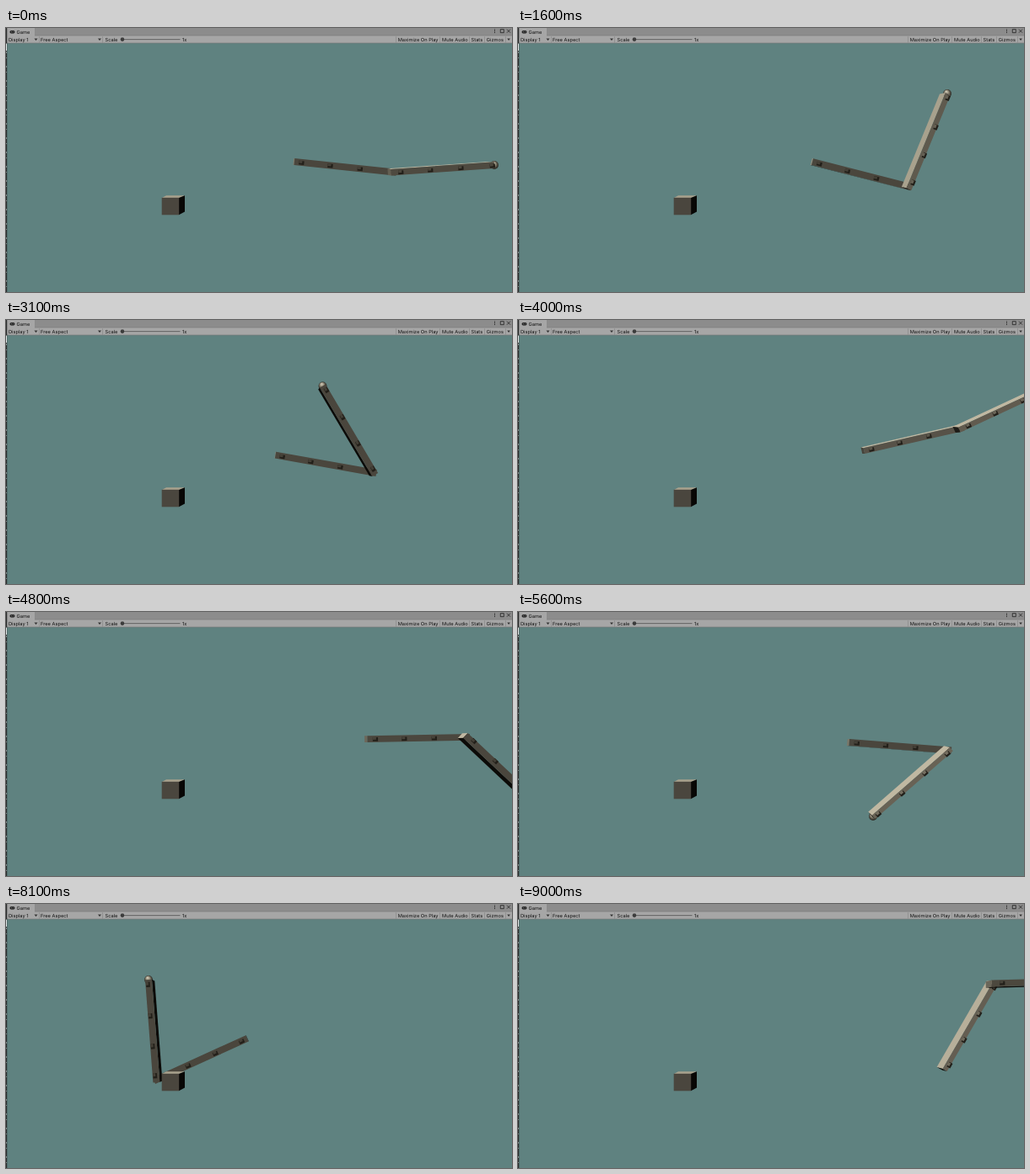
An HTML page that plays this animation: 600x314 px, repeating every 9.1 s.

```html
<!DOCTYPE html>
<html lang="en">
<head>
<meta charset="utf-8">
<title>Two-link arm</title>
<style>
html, body { margin: 0; width: 100%; height: 100%; overflow: hidden; background: #5f8280; }
svg { display: block; width: 100%; height: 100%; }
text { font: 5.7px Inter, Roboto, sans-serif; fill: #111; text-rendering: geometricPrecision; }
</style>
</head>
<body>
<svg viewBox="0 0 600 314" preserveAspectRatio="none">
  <defs>
    <radialGradient id="ball" cx=".5" cy=".5" r=".55" fx=".36" fy=".22">
      <stop offset="0" stop-color="#d6d0be"/>
      <stop offset=".4" stop-color="#99927f"/>
      <stop offset=".8" stop-color="#3f3b33"/>
      <stop offset="1" stop-color="#15130f"/>
    </radialGradient>
  </defs>
  <rect width="600" height="314" fill="#5f8280"/>
  <g id="arm"></g>
  <path d="M185 202L190 199.300H212L205.500 202Z" fill="#a8a18d"/>
  <path d="M205 202L212 199.300V218.500L205 222.300Z" fill="#080705"/>
  <path d="M184.700 201.800H205.200V222.300H184.700Z" fill="#4a463e"/>

  <rect width="600" height="9" fill="#8c8c8c"/>
  <rect x="1" width="33" height="9.500" fill="#a6a6a6"/>
  <rect y="9" width="600" height="9" fill="#a6a6a6"/>
  <path d="M34 9H600" stroke="#7b7b7b" stroke-width=".6"/>
  <path d="M0 18H600" stroke="#6d7474" stroke-width=".7"/>
  <path d="M.6 0V314" stroke="#2a2c2c" stroke-width="1.300"/>
  <path d="M.5 28V314" stroke="#8f9696" stroke-width=".8" stroke-dasharray="2 5 1 9"/>
  <path d="M.5 18.500V27" stroke="#dfe3e3"/>
  <rect x="4.500" y="3" width="6" height="3.400" rx="1.700" fill="#222"/>
  <path d="M6 4.700h1.200M8.400 4.700h.8" stroke="#bbb" stroke-width=".7"/>
  <g id="labels"></g>
  <path d="M39.500 10V17.500M114.500 10V17.500M462.500 10V17.500M514.500 10V17.500M549.500 10V17.500M567.500 10V17.500M592.500 10V17.500" stroke="#858585" stroke-width=".6"/>
  <path d="M33.500 12.500h4l-2 2.500zM109 12.500h4l-2 2.500zM594.300 12.500h3.600l-1.800 2.500z" fill="#333"/>
  <path d="M138 13.600H206.500" stroke="#5c5c5c" stroke-width=".9"/>
  <circle cx="138" cy="13.600" r="2.300" fill="#3c3c3c"/>
  <path d="M579.500 1.500v1M579.500 3.200v1M579.500 4.900v1" stroke="#222"/>
  <path d="M586.300 1.600h4v4h-4zM594 1.600l4 4M598 1.600l-4 4" fill="none" stroke="#222" stroke-width=".8"/>
</svg>
<script>
const LOOP = 9100, STEP = 100, LEN = 119.5, RAD = Math.PI / 180;
const EYE = [300, 157], DEPTH = 0.026, HALF = 4, LIGHT = [-0.5, -0.86];

const labels = [
  ["Game", 12.5, 6.7], ["Display 1", 3, 15.5], ["Free Aspect", 41, 15.5],
  ["Scale", 117.5, 15.5], ["1x", 209, 15.5], ["Maximize On Play", 464.7, 15.5],
  ["Mute Audio", 517, 15.5], ["Stats", 551.6, 15.5], ["Gizmos", 569.8, 15.5]
];
document.getElementById("labels").innerHTML =
  labels.map(([s, x, y]) => `<text x="${x}" y="${y}">${s}</text>`).join("");

// Drags of the ball: start, end, x, y, ease (0 smooth, >0 in, <0 out)
const drags = [
  [600, 1200, 579, 78, 0], [1200, 1600, 509, 78, 1.6],
  [1600, 2500, 105, 78, -1.2], [2500, 2600, 117, 79, 1],
  [2600, 3600, 634, 78, 0], [4300, 4900, 634, 243, 0],
  [5300, 5600, 421, 243, 1.2], [5600, 6200, 106, 243, -1.4],
  [6800, 7400, 106, 90, 0], [7800, 8100, 169, 90, 1.5],
  [8100, 8800, 632, 90, 1], [8800, 9000, 684, 91, 1]
];
// Link angles at fixed times: ball to joint, joint to tail
const keys = [
  [0, 176, 186], [1600, 112.2, 194.4], [2600, 7.7, 103.3], [4000, 155, 167],
  [5600, 318.8, 184.5], [8100, 445.6, 335.4], [9000, 538.4, 480]
];

function ease(u, e) {
  if (e === 0) return u * u * (3 - 2 * u);
  return e > 0 ? u ** e : 1 - (1 - u) ** -e;
}

function ballAt(t) {
  let x = 579, y = 163;
  for (const [t0, t1, tx, ty, e] of drags) {
    if (t <= t0) break;
    const k = ease(Math.min(1, (t - t0) / (t1 - t0)), e);
    x += (tx - x) * k;
    y += (ty - y) * k;
  }
  return [x, y];
}

// Each link is pulled along its own axis, like a towed chain
function tow(a, b, vx, vy) {
  const pull = vx * Math.cos(a) + vy * Math.sin(a);
  const jx = pull * Math.cos(a), jy = pull * Math.sin(a);
  return [
    a + (vx * Math.sin(a) - vy * Math.cos(a)) / LEN,
    b + (jx * Math.sin(b) - jy * Math.cos(b)) / LEN
  ];
}

function buildPoses() {
  const poses = [], SUB = 60;
  for (let k = 0; k < keys.length - 1; k++) {
    const [t0, a0, b0] = keys[k], [t1, a1, b1] = keys[k + 1];
    let a = a0 * RAD, b = b0 * RAD, dist = 0;
    let p = ballAt(t0);
    const run = [{ p, a, b, dist }];
    for (let t = t0; t < t1; t += STEP) {
      for (let i = 1; i <= SUB; i++) {
        const q = ballAt(t + STEP * i / SUB);
        const vx = q[0] - p[0], vy = q[1] - p[1];
        [a, b] = tow(a, b, vx, vy);
        dist += Math.hypot(vx, vy);
        p = q;
      }
      run.push({ p, a, b, dist });
    }
    const da = a1 * RAD - a, db = b1 * RAD - b;
    run.forEach((s, i) => {
      const w = s.dist / dist;
      poses[t0 / STEP + i] = { p: s.p, a: s.a + da * w, b: s.b + db * w };
    });
  }
  return poses;
}

const mix = (c, d, k) => `rgb(${c.map((v, i) => Math.round(v + (d[i] - v) * k))})`;
const clamp = v => Math.max(0, Math.min(1, v));
const dot = (u, v) => u[0] * v[0] + u[1] * v[1];
const move = (p, d, k) => [p[0] + d[0] * k, p[1] + d[1] * k];
const back = p => p.map((v, i) => v + (EYE[i] - v) * DEPTH);
const poly = (pts, fill) =>
  `<polygon points="${pts.map(p => p.map(v => v.toFixed(2))).join(" ")}" fill="${fill}"/>`;

function slab(c, d, n, half, wide) {
  return [[-1, -1], [1, -1], [1, 1], [-1, 1]]
    .map(([u, v]) => move(move(c, d, u * half), n, v * wide));
}

function beam(p, q, before, after) {
  const len = Math.hypot(q[0] - p[0], q[1] - p[1]);
  const d = [(q[0] - p[0]) / len, (q[1] - p[1]) / len], n = [-d[1], d[0]];
  const half = (len + before + after) / 2;
  const mid = move(p, d, half - before);
  const glow = clamp(-2 * d[0] * d[1]) * clamp((mid[0] - EYE[0]) / 100);
  // A beam rolled towards the light shows less front and more side
  const roll = glow * HALF * 0.3;
  const box = slab(mid, d, n, half, HALF);
  const front = slab(move(mid, n, -Math.sign(dot(n, LIGHT)) * roll), d, n, half, HALF - roll);
  const normals = [[-n[0], -n[1]], d, n, [-d[0], -d[1]]];
  let out = "";
  normals.forEach((m, i) => {
    const j = (i + 1) % 4, u = box[i], v = box[j];
    const face = [(u[0] + v[0]) / 2, (u[1] + v[1]) / 2];
    if (dot(m, [EYE[0] - face[0], EYE[1] - face[1]]) <= 0) return;
    const lit = clamp(dot(m, LIGHT) * 1.1);
    out += poly([front[i], front[j], back(v), back(u)],
      mix([12, 11, 8], [192, 184, 162], lit));
  });
  out += poly(front, mix([74, 70, 61], [104, 98, 85], glow));
  for (const f of [0.05, 0.34, 0.64, 0.95]) {
    const c = move(p, d, len * f);
    const k = c.map((v, i) => v + (v - EYE[i]) * 0.012);
    out += poly(slab([k[0] + 0.5, k[1] + 0.6], d, n, 3.1, 2.3), "#221f19");
    out += poly(slab([k[0] - 0.5, k[1] - 0.5], d, n, 2, 1.5),
      mix([68, 64, 55], [118, 112, 98], glow));
  }
  return out;
}

const poses = buildPoses(), arm = document.getElementById("arm");
let shown = -1;

function draw() {
  const i = Math.floor(performance.now() % LOOP / STEP);
  if (i !== shown) {
    shown = i;
    const { p, a, b } = poses[i];
    const joint = move(p, [Math.cos(a), Math.sin(a)], LEN);
    const tail = move(joint, [Math.cos(b), Math.sin(b)], LEN - 2.5);
    arm.innerHTML = beam(tail, joint, 1.5, 3) +
      `<circle cx="${p[0]}" cy="${p[1]}" r="4.900" fill="url(#ball)"/>` +
      beam(joint, p, 3, 0);
  }
  requestAnimationFrame(draw);
}
draw();
</script>
</body>
</html>
```
